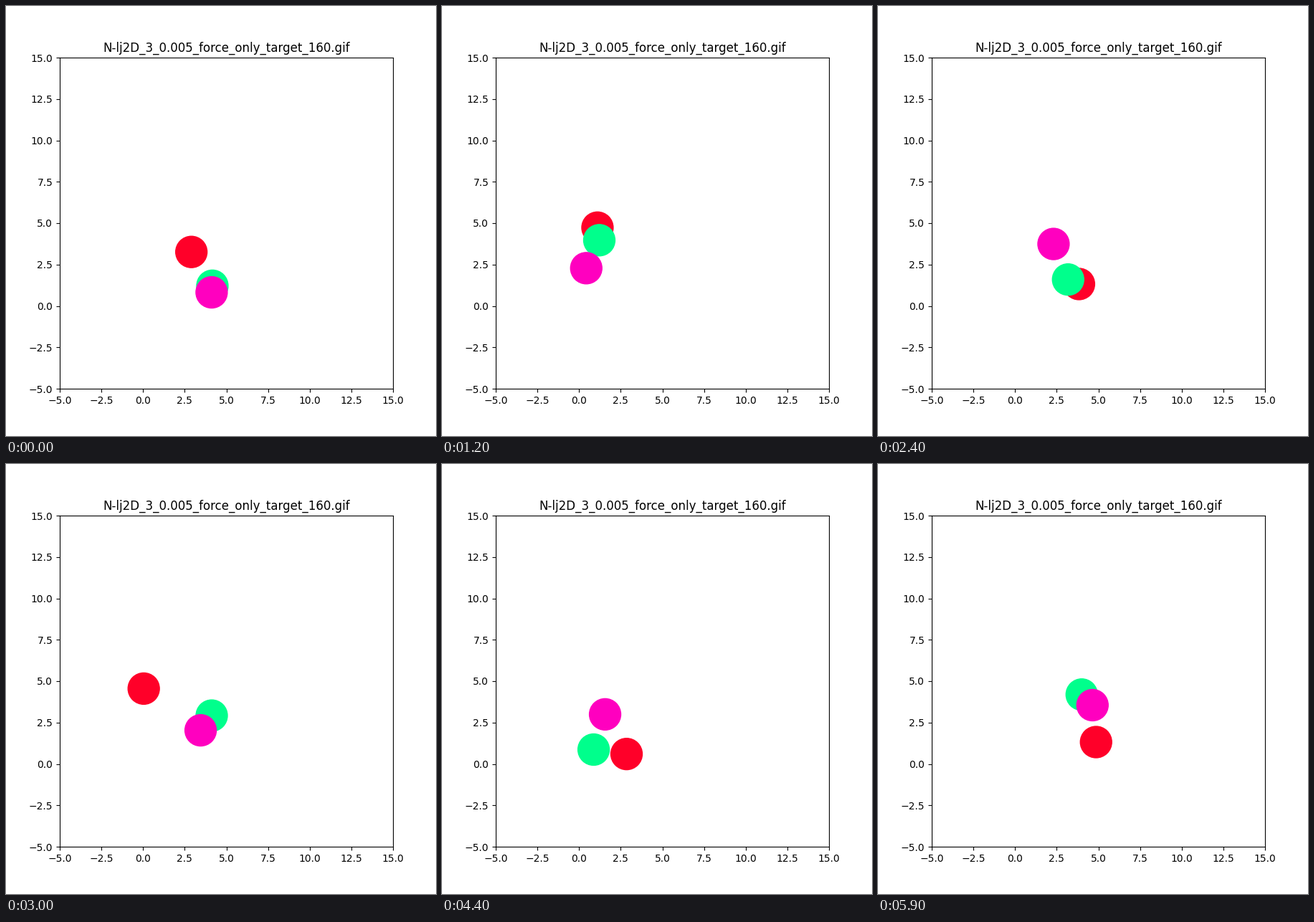
Animation, 600 px wide and 600 px high, one loop 6 s. Source, as a matplotlib script:

```python
import numpy as np
import matplotlib.pyplot as plt
from matplotlib.animation import FuncAnimation

FRAMES = 60
BOX = 5.0  # side of the periodic cell
TITLE = "N-lj2D_3_0.005_force_only_target_160.gif"

# Key points of two balls, unwrapped; each drifts evenly from one to the next.
KEYS = [0, 7, 17, 30, 38, 49, 59]
RED = np.array([(2.90, 3.26), (4.78, 1.07), (7.43, -1.61), (10.04, -5.45),
                (11.70, -7.83), (13.81, -10.71), (14.86, -13.68)])
GREEN = np.array([(4.16, 1.22), (5.34, 2.89), (7.09, 5.05), (9.12, 7.92),
                  (10.04, 9.65), (11.57, 11.88), (14.00, 14.19)])

# Total momentum is conserved, so the sum of all positions moves in a line.
SUM_START = np.array([11.175, 5.30])
SUM_SPEED = np.array([0.548, -0.36])


def glide(step, path):
    return np.array([np.interp(step, KEYS, axis) for axis in path.T])


def positions(step):
    """Red, green and magenta centres, wrapped into the cell."""
    red, green = glide(step, RED), glide(step, GREEN)
    magenta = SUM_START + SUM_SPEED * step - red - green
    return np.array([red, green, magenta]) % BOX


fig, ax = plt.subplots(figsize=(6, 6), dpi=100)
ax.set(xlim=(-5, 15), ylim=(-5, 15), title=TITLE)
balls = ax.scatter(*positions(0).T, s=1000, c=range(3), cmap="gist_rainbow")


def draw(step):
    balls.set_offsets(positions(step))
    return [balls]


anim = FuncAnimation(fig, draw, frames=FRAMES, init_func=lambda: draw(0),
                     interval=100, repeat=True, repeat_delay=0)
plt.show()
```
